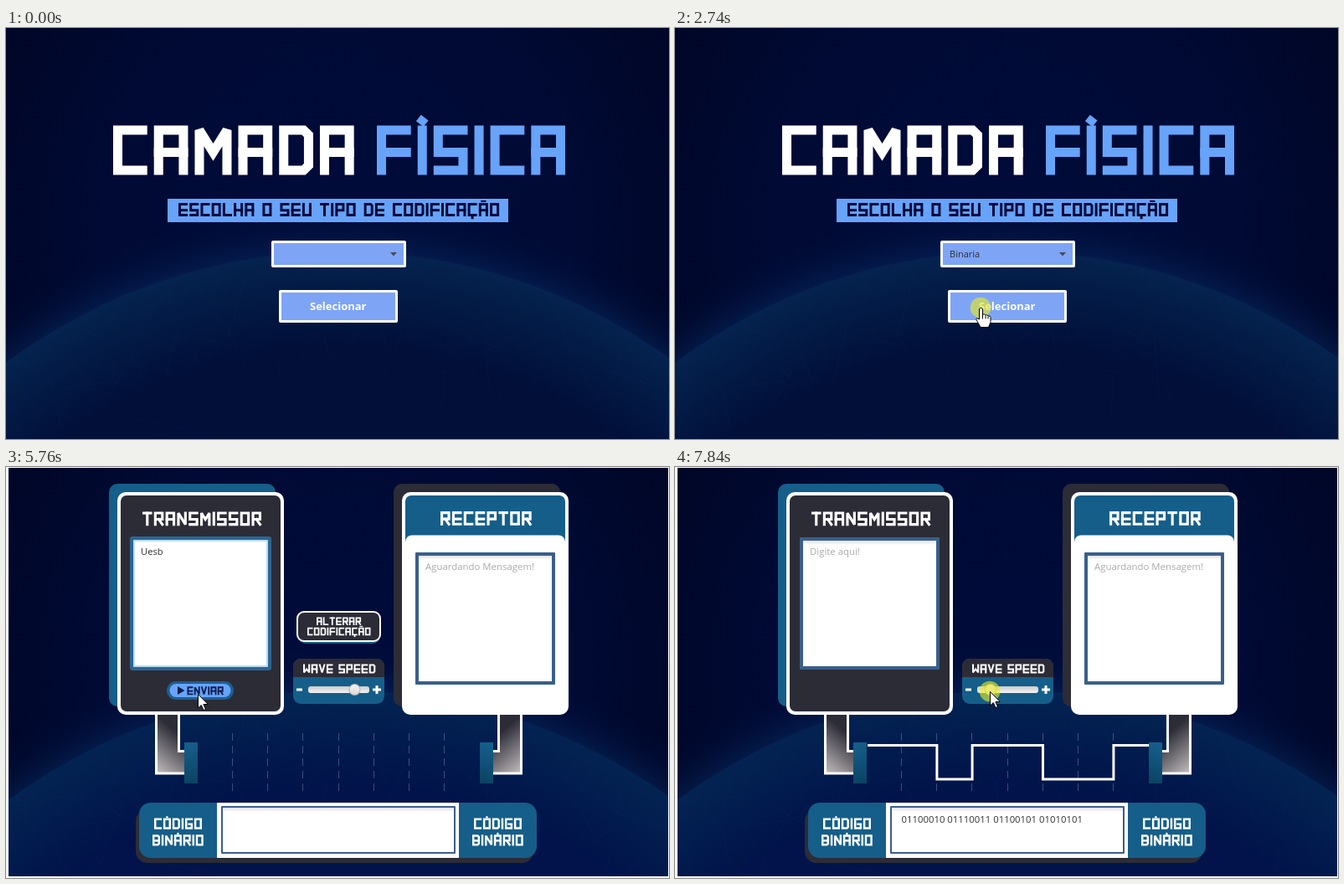
Write an HTML page with a canvas that moves like this. It is 792 px wide and 491 px high and loops after 8 s.

```html
<!DOCTYPE html>
<html lang="pt">
<head>
<meta charset="utf-8">
<title>Camada Física</title>
<style>
  html, body { margin: 0; width: 100%; height: 100%; overflow: hidden; background: #fff; }
  canvas { display: block; width: 792px; height: 491px; }
</style>
</head>
<body>
<canvas id="stage" width="792" height="491" role="img" aria-label="Camada Física: transmissor e receptor"></canvas>
<script>
const ctx = document.getElementById('stage').getContext('2d');
const LOOP = 8000, SWITCH = 2830, SEND = 5870, GRAB = 6990;
const BLUE = '#155e89', DARK = '#2c2c37', SKY = '#67a3f9', BOX = '#7ea4f5', EDGE = '#3a5f8b';
const BITS = '01100010 01110011 01100101 01010101';

/* Block lettering: strokes between the points of a 3x3 pad (a-i); j-m cut the right corners. */
const PAD = { a: [0, 0], b: [.5, 0], c: [1, 0], d: [0, .55], e: [.5, .55], f: [1, .55], g: [0, 1], h: [.5, 1], i: [1, 1],
  j: [.8, 0], k: [1, .12], l: [1, .88], m: [.8, 1] };
const GLYPHS = { A: 'gaci,df', B: 'ajklmga,df', C: 'cagi', D: 'ajklmga', E: 'cagi,df', F: 'cag,df', G: 'cagife', H: 'ag,ci,df',
  I: 'ag', L: 'agi', M: 'gaeci', N: 'gaic', O: 'aciga', P: 'gacfd', R: 'gacfd,ei', S: 'cadfig', T: 'ac,bh', U: 'agic',
  V: 'ahc', W: 'ageic' };
const widthOf = ch => ch === ' ' ? .356 : ch === 'I' ? .187 : 'MW'.includes(ch) ? .746 : .69;

function line(...points) {
  ctx.beginPath();
  points.forEach(([x, y], i) => i ? ctx.lineTo(x, y) : ctx.moveTo(x, y));
}

function lettering(text, x, y, size, color) {
  const weight = size * .187;
  let left = x, center = x;
  ctx.strokeStyle = color;
  ctx.lineWidth = weight;
  ctx.lineJoin = 'miter';
  ctx.miterLimit = 2;
  for (const ch of text.normalize('NFD')) {
    ctx.lineCap = 'butt';
    if (ch === '\u0301') {
      line([center - size * .05, y - size * .03], [center + size * .05, y - size * .16]);
      ctx.stroke();
    } else if (ch === '\u0303') {
      line([center - size * .2, y - size * .13], [center + size * .2, y - size * .13]);
      ctx.lineWidth = weight * .65;
      ctx.stroke();
      ctx.lineWidth = weight;
    } else if (ch === '\u0327') {
      line([center, y + size], [center, y + size * 1.2]);
      ctx.stroke();
    } else {
      const width = widthOf(ch) * size;
      ctx.lineCap = 'square';
      for (const stroke of (GLYPHS[ch] || '').split(',')) {
        if (!stroke) continue;
        line(...[...stroke].map(p => [left + weight / 2 + PAD[p][0] * (width - weight),
          y + weight / 2 + PAD[p][1] * (size - weight)]));
        if (stroke[0] === stroke.at(-1)) ctx.closePath();
        ctx.stroke();
      }
      center = left + width / 2;
      left += width + size * .136;
    }
  }
  ctx.lineCap = 'butt';
}

function label(text, x, y, color, size = 11.4, weight = 400) {
  ctx.font = `${weight} ${size}px "Open Sans", sans-serif`;
  ctx.fillStyle = color;
  ctx.fillText(text, x, y);
  return ctx.measureText(text).width;
}

function rect(x, y, w, h, fill, radius = 0) {
  ctx.fillStyle = fill;
  ctx.beginPath();
  ctx.roundRect(x, y, w, h, radius);
  ctx.fill();
}

function disc(x, y, r, fill) {
  ctx.fillStyle = fill;
  ctx.beginPath();
  ctx.arc(x, y, r, 0, 7);
  ctx.fill();
}

function shade(gradient, ...colors) {
  colors.forEach((c, i) => gradient.addColorStop(i / (colors.length - 1), c));
  return gradient;
}

function random(seed) {
  return () => (seed = seed * 16807 % 2147483647) / 2147483647;
}

const scratches = new Path2D(), rnd = random(77);
for (let i = 0; i < 60; i++) {
  const x = rnd() * 792, y = 300 + rnd() * 190, angle = rnd() * 6.3, length = 20 + rnd() * 70;
  scratches.moveTo(x, y);
  scratches.lineTo(x + Math.cos(angle) * length, y + Math.sin(angle) * length);
}

function space(near, far) {
  rect(0, 0, 792, 491, shade(ctx.createRadialGradient(396, 230, 60, 396, 230, 500), '#000b39', '#000a34', '#000523'));
  disc(400, 935, 730, shade(ctx.createRadialGradient(400, 935, 662, 400, 935, 730), 'rgba(8,48,104,.5)', 'rgba(4,30,80,.2)', 'rgba(0,10,50,0)'));
  ctx.save();
  ctx.beginPath();
  ctx.arc(400, 935, 668, 0, 7);
  ctx.clip();
  rect(0, 260, 792, 231, shade(ctx.createRadialGradient(400, 935, 440, 400, 935, 668), far, far, near));
  ctx.strokeStyle = 'rgba(60,110,170,.06)';
  ctx.lineWidth = 1;
  ctx.stroke(scratches);
  ctx.restore();
}

/* Pointer path: time, x, y. */
const PATH = [[230, 695, 472], [480, 480, 325], [620, 375, 243], [740, 333, 257], [840, 360, 259], [980, 363, 265],
  [1350, 363, 265], [1650, 361, 299], [2190, 361, 299], [2530, 365, 334], [2860, 365, 334], [3440, 221, 129],
  [5150, 221, 129], [5730, 229, 271], [5960, 229, 271], [6730, 415, 266], [7060, 415, 266], [7570, 376, 268]];
const CLICKS = [[1050, 1150], [1950, 2020], [2740, SWITCH], [5790, 5900], [GRAB, LOOP]];

function pointerAt(t) {
  const next = PATH.findIndex(p => p[0] > t);
  if (next < 0) return PATH.at(-1).slice(1);
  const [t0, x0, y0] = PATH[next - 1], [t1, x1, y1] = PATH[next];
  const k = (t - t0) / (t1 - t0), eased = t < 840 ? k : k * k * (3 - 2 * k);
  return [x0 + (x1 - x0) * eased, y0 + (y1 - y0) * eased];
}

const ARROW = new Path2D('M0 0V16.5L3.8 13L6.5 19L9 18L6.4 12H11.8Z');
const HAND = new Path2D('M-2 1Q0 -1 2 1V8Q4 6.5 5.5 8.5Q7.5 7.5 8.5 9.5Q11 9 11.5 11V17L9 23H-.5L-5.5 14Q-6 11 -2 13.5Z');
const BEAM = new Path2D('M-3 -7.5H-1L0 -6.5L1 -7.5H3M0 -6.5V6.5M-3 7.5H-1L0 6.5L1 7.5H3');

function pointer(t) {
  if (t < 230) return;
  const [x, y] = pointerAt(t);
  if (CLICKS.some(([from, to]) => t >= from && t < to)) disc(x, y, 12.3, 'rgba(230,235,35,.62)');
  ctx.save();
  ctx.translate(x + .5, y + .5);
  ctx.lineWidth = 1;
  ctx.strokeStyle = '#000';
  ctx.fillStyle = '#fff';
  const overText = t > SWITCH && x > 153 && x < 312 && y > 88 && y < 238;
  if (overText) {
    ctx.strokeStyle = '#fff';
    ctx.lineWidth = 3;
    ctx.stroke(BEAM);
    ctx.strokeStyle = '#111';
    ctx.lineWidth = 1.3;
    ctx.stroke(BEAM);
  } else {
    const onButton = t < SWITCH && t > 2200 && y > 313;
    const shape = onButton ? HAND : ARROW;
    ctx.fill(shape);
    ctx.stroke(shape);
    if (onButton) {
      line([2, 8], [2, 13]);
      ctx.moveTo(5.5, 9);
      ctx.lineTo(5.5, 13);
      ctx.moveTo(8.5, 10);
      ctx.lineTo(8.5, 13);
      ctx.stroke();
    }
  }
  ctx.restore();
}

function menuScene(t) {
  space('#04234e', '#010f39');
  lettering('CAMADA', 128, 116.5, 59, '#fff');
  lettering('FÍSICA', 443, 116.5, 59, SKY);
  rect(193, 204, 407, 28, SKY);
  lettering('ESCOLHA O SEU TIPO DE CODIFICAÇÃO', 206, 209, 16, '#020b3c');

  rect(317, 254, 161, 32, '#fff', 2);
  rect(320, 257, 155, 26, BOX);
  line([459, 268], [467, 268], [463, 272.5]);
  ctx.fillStyle = '#474b55';
  ctx.fill();
  if (t >= 2020) label('Binaria', 328, 274, '#2b2f3c', 11);

  rect(326, 313, 142, 39, '#fff', 2);
  rect(329, 316, 136, 33, BOX);
  label('Selecionar', 363, 337, '#fff', 13, 700);

  if (t >= 1090 && t < 2020) {
    rect(319, 286, 156, 81, '#b8bcc6', 2);
    rect(320, 287, 154, 79, '#fff');
    const hovered = pointerAt(t)[1] > 287;
    ['Binaria', 'Manchester', 'Manchester Diferencial'].forEach((name, i) => {
      const active = hovered && i === 0;
      if (active) rect(320, 287, 154, 26, '#0096c9');
      label(name, 328, 304 + i * 26, active ? '#fff' : '#333', 11);
    });
  }
}

function field(x, y, w, h, border, color = EDGE) {
  rect(x, y, w, h, color, 1);
  rect(x + border, y + border, w - border * 2, h - border * 2, '#fff');
  rect(x + border, y + border, w - border * 2, 5, shade(ctx.createLinearGradient(0, y + border, 0, y + border + 5), '#dfe1e5', '#fff'));
}

function pipe() {
  line([179.5, 294], [179.5, 366], [214, 366], [214, 339.5], [206.5, 339.5], [206.5, 294]);
  ctx.fillStyle = shade(ctx.createLinearGradient(176, 362, 210, 322), '#c3bfbf', '#77747a', DARK);
  ctx.fill();
  ctx.strokeStyle = '#fff';
  ctx.lineWidth = 3;
  line([179.5, 294], [179.5, 366], [214, 366]);
  ctx.moveTo(206.5, 294);
  ctx.lineTo(206.5, 339.5);
  ctx.lineTo(214, 339.5);
  ctx.stroke();
  rect(213, 329, 16, 49, shade(ctx.createLinearGradient(213, 335, 229, 376), BLUE, '#0c4263'));
}

function mirrored(draw) {
  ctx.save();
  ctx.translate(795, 0);
  ctx.scale(-1, 1);
  draw();
  ctx.restore();
}

/* Bits leave the end of the message first and slow down as the slider is dragged. */
function bitsSent(t) {
  if (t < 5960) return 0;
  const late = [7120, 7290, 7540, 7840].filter(time => t >= time).length;
  return Math.min(14, 1 + Math.floor((t - 5960) / 80)) + late;
}

function wave(t) {
  const bits = BITS.replaceAll(' ', ''), first = bits.length - bitsSent(t);
  const edge = i => 230 + i * 42;
  ctx.strokeStyle = 'rgba(130,160,195,.42)';
  ctx.lineWidth = 1;
  ctx.setLineDash([9, 6]);
  for (let i = 0; i < 7; i++) {
    const x = Math.round(271 + i * 42.2) - .5;
    line([x, 318], [x, 389]);
    ctx.stroke();
  }
  ctx.setLineDash([]);
  const points = [];
  for (let i = 0; i < 8 && first + i < bits.length; i++) {
    const y = bits[first + i] === '1' ? 332.5 : 373;
    const left = i ? 270.7 + (i - 1) * 42.2 : edge(0), right = 270.7 + i * 42.2;
    points.push([left, y], [right, y]);
  }
  if (!points.length) return;
  line(...points);
  ctx.strokeStyle = '#fff';
  ctx.lineWidth = 3;
  ctx.stroke();
}

const KEYS = [4330, 4700, 4870, 5070];

function message(t) {
  const focused = t < GRAB;
  if (focused) {
    rect(148, 83, 169, 160, '#2d6592', 3);
    rect(152, 87, 161, 152, '#b9dcf0', 1);
    rect(154, 89, 157, 148, '#fff');
    const typed = KEYS.filter(k => t >= k).length;
    const width = label(t < SEND ? 'Uesb'.slice(0, typed) : '', 161, 105, '#333', 11.2);
    const since = typed ? KEYS[typed - 1] : SWITCH;
    if ((t - since) % 1000 < 500) rect(160 + width + (typed && width ? 1 : 0), 92, 1.5, 18, '#777');
  } else {
    field(149, 84, 167, 158, 4);
    label('Digite aqui!', 161, 105, '#aaa');
  }
}

function slider(t) {
  rect(343, 229, 109, 54, BLUE, 9);
  rect(343, 229, 109, 22, DARK, [9, 9, 0, 0]);
  lettering('WAVE SPEED', 355, 235.5, 11, '#fff');
  rect(347, 264.5, 7, 3, '#fff');
  rect(438, 264.5, 10, 3, '#fff');
  rect(441.5, 261, 3, 10, '#fff');
  rect(361, 262, 73, 8, shade(ctx.createLinearGradient(0, 262, 0, 270), '#c9cbcc', '#f3f3f3'), 3);
  const x = t < 7060 ? 416.5 : pointerAt(t)[0] + .8;
  disc(x, 266, 7, '#b3b3b3');
  disc(x, 266, 6, shade(ctx.createLinearGradient(0, 260, 0, 272), '#f4f4f4', '#dcdcdc'));
}

function linkScene(t) {
  const idle = t < SEND;
  rect(0, 0, 792, 491, '#fff');
  ctx.save();
  ctx.beginPath();
  ctx.rect(3, 1, 788, 488);
  ctx.clip();
  space('#032352', '#01134a');
  ctx.restore();

  pipe();
  mirrored(pipe);
  wave(t);

  rect(123, 20, 199, 266, BLUE, 10);
  rect(133, 30, 199, 266, '#fff', 10);
  rect(137, 34, 191, 258, DARK, 7);
  lettering('TRANSMISSOR', 163, 53.5, 16.7, '#fff');
  message(t);

  rect(463, 20, 199, 266, DARK, 10);
  rect(473, 30, 199, 266, '#fff', 10);
  rect(477, 34, 191, 60, BLUE, [7, 7, 0, 0]);
  rect(477, 81.5, 191, 40, '#fff', [8, 8, 0, 0]);
  lettering('RECEPTOR', 519, 53, 16.8, '#fff');
  field(489, 102, 167, 158, 4);
  label('Aguardando Mensagem!', 501, 123, '#aaa');

  if (idle) {
    rect(192, 256, 80, 22, '#1d5f8f', 11);
    rect(195.5, 259, 73, 16, SKY, 8);
    line([205, 262], [213.5, 267], [205, 272]);
    ctx.fillStyle = '#0b1d4d';
    ctx.fill();
    lettering('ENVIAR', 216.5, 262.3, 10, '#0b1d4d');

    rect(349, 180, 98, 31, BLUE, 9);
    rect(347, 172, 101, 37, '#fff', 9);
    rect(349, 174, 97, 33, DARK, 7);
    lettering('ALTERAR', 371, 179.5, 9.4, '#fff');
    lettering('CODIFICAÇÃO', 360, 191.7, 9.5, '#fff');
  }
  slider(t);

  rect(155, 409, 475, 64, DARK, 14);
  rect(159, 401, 475, 66, BLUE, 14);
  rect(252, 401, 289, 66, '#fff');
  field(257, 405, 280, 57, 2);
  for (const x of [177, 559]) {
    lettering('CÓDIGO', x, 419.5, 13.2, '#fff');
    lettering('BINÁRIO', x - 2, 439.3, 13.1, '#fff');
  }
  if (!idle) label(BITS, 270.5, 425, '#333', 11.35);
}

function frame(now) {
  const t = now % LOOP;
  (t < SWITCH ? menuScene : linkScene)(t);
  pointer(t);
  requestAnimationFrame(frame);
}
requestAnimationFrame(frame);
</script>
</body>
</html>
```
